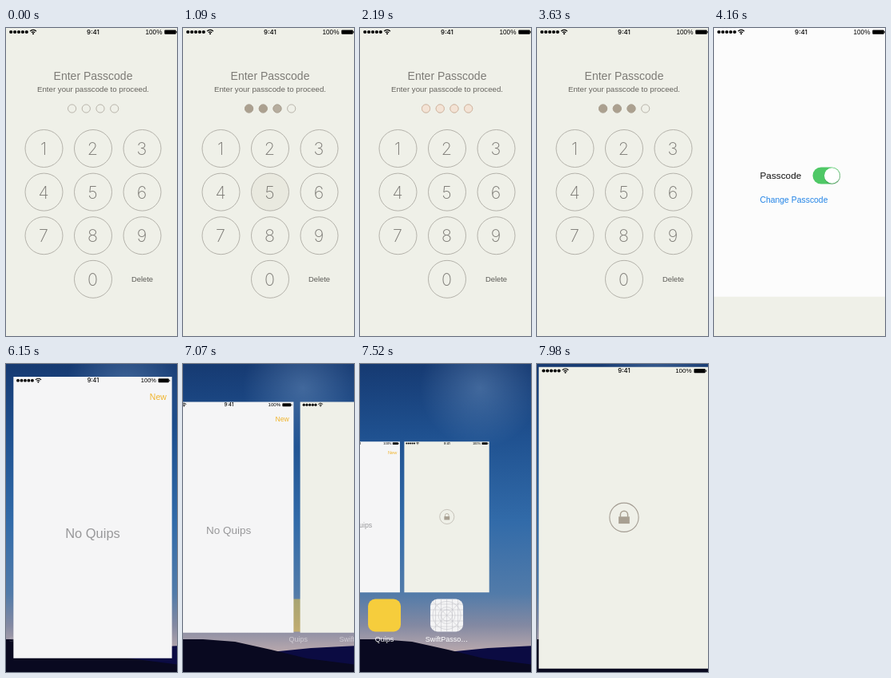
Write an HTML page with a canvas that moves like this. It is 214 px wide and 386 px high and loops after 8 s.

```html
<!DOCTYPE html>
<html lang="en">
<head>
<meta charset="utf-8">
<title>Passcode lock</title>
<style>
  html, body { margin: 0; width: 100%; height: 100%; overflow: hidden; background: #eff0e8; }
  canvas { display: block; width: 214px; height: 386px; }
</style>
</head>
<body>
<canvas id="stage"></canvas>
<script>
const LOOP = 8000, W = 217, H = 386, MID = W / 2;
const SANS = '"Liberation Sans", Arial, sans-serif';
const LIGHT = 'Inter, "Liberation Sans", sans-serif';
const BEIGE = '#eff0e8', TAUPE = '#aba08f';
const canvas = document.getElementById('stage');
const ctx = canvas.getContext('2d');
const ratio = window.devicePixelRatio || 1;
canvas.width = 214 * ratio;
canvas.height = H * ratio;

const clamp = v => Math.min(1, Math.max(0, v));
const easeOut = v => 1 - (1 - clamp(v)) ** 2;
// Critically damped spring from 0 to 1; ms since start, speed in 1/s
const spring = (ms, speed) => {
  const x = Math.max(0, ms) * speed / 1000;
  return 1 - (1 + x) * Math.exp(-x);
};

function text(str, x, y, font, color, align = 'center') {
  ctx.font = font;
  ctx.fillStyle = color;
  ctx.textAlign = align;
  ctx.textBaseline = 'middle';
  ctx.fillText(str, x, y);
}

function circle(x, y, r, fill, stroke, width = 1) {
  ctx.beginPath();
  ctx.arc(x, y, r, 0, Math.PI * 2);
  if (fill) { ctx.fillStyle = fill; ctx.fill(); }
  if (stroke) { ctx.strokeStyle = stroke; ctx.lineWidth = width; ctx.stroke(); }
}

function box(x, y, w, h, fill, r = 0) {
  ctx.beginPath();
  ctx.roundRect(x, y, w, h, r);
  ctx.fillStyle = fill;
  ctx.fill();
}

function withAlpha(alpha, draw) {
  ctx.save();
  ctx.globalAlpha *= clamp(alpha);
  draw();
  ctx.restore();
}

function statusBar() {
  for (let i = 0; i < 5; i++) circle(6.2 + i * 4.9, 5, 2.1, '#000');
  ctx.strokeStyle = '#000';
  ctx.lineWidth = 1.2;
  for (const r of [2.8, 5.2]) {
    ctx.beginPath();
    ctx.arc(34, 7.6, r, -Math.PI * 0.77, -Math.PI * 0.23);
    ctx.stroke();
  }
  circle(34, 7.2, 1, '#000');
  text('9:41', 109, 5.3, '500 8px ' + LIGHT, '#000');
  text('100%', 174.5, 5.3, '8.2px ' + SANS, '#000', 'left');
  box(198.3, 2.4, 14.5, 5.4, '#000', 1);
  box(213.3, 4, 1, 2.2, '#000');
}

function settings() {
  box(0, 0, W, H, '#fcfcfc');
  text('Passcode', 57.5, 185.5, '11.8px ' + SANS, '#111', 'left');
  text('Change Passcode', 57.5, 216.5, '10.4px ' + SANS, '#2384e6', 'left');
  box(123.5, 174.5, 34.5, 21, '#4fc866', 10.5);
  circle(148, 186, 10.2, 'rgba(0,0,0,.16)');
  circle(147.7, 185, 9.7, '#fff');
}

function memos() {
  box(0, 0, W, H, '#f5f5f6');
  text('No Quips', MID, 215.5, '18px ' + SANS, '#98989a');
  text('New', 198, 29, '11.5px ' + SANS, '#f0b42c');
}

function lockScreen() {
  box(0, 0, W, H, BEIGE);
  circle(109, 192.5, 18.5, null, '#a39c92', 1.1);
  box(102, 191.5, 14, 9, '#a8a092');
  ctx.beginPath();
  ctx.moveTo(104.3, 192);
  ctx.lineTo(104.3, 189);
  ctx.arc(109, 189, 4.7, Math.PI, 0);
  ctx.lineTo(113.7, 192);
  ctx.strokeStyle = '#a8a092';
  ctx.lineWidth = 1.5;
  ctx.stroke();
}

// Each press: time and key
const wrong = [[290, 5], [630, 5], [970, 5], [1450, 5]];
const right = [[2540, 1], [2900, 2], [3250, 3], [3920, 4]];
const RETRY = right[0][0], REJECT = 1600, DISMISS = 3982;

function entryDots(t) {
  const retry = t >= RETRY;
  const error = retry ? 1 - clamp((t - RETRY) / 150) : easeOut((t - REJECT) / 350);
  const s = (t - REJECT) / 1000;
  const shake = s > 0 && s < 0.6 ? 15 * Math.exp(-8 * s) * Math.cos(s * 2 * Math.PI / 0.16) : 0;
  (retry ? right : wrong).forEach(([start], i) => {
    const x = 82.6 + 17.7 * i + shake, y = 101;
    const filled = easeOut((t - start) / 200) * (retry ? 1 : 1 - error);
    circle(x, y, 5.1, null, '#b3aea4', 0.9);
    withAlpha(error, () => circle(x, y, 5.1, '#f3e3d5', '#d8b9a2', 0.9));
    withAlpha(filled, () => circle(x, y, 5.1, TAUPE, TAUPE, 0.9));
  });
}

function keypad(t) {
  for (let n = 0; n < 10; n++) {
    const x = n ? 47.5 + (n - 1) % 3 * 61.5 : 109;
    const y = 151 + (n ? Math.floor((n - 1) / 3) : 3) * 54.6;
    const press = [...wrong, ...right].find(([at, key]) => key === n && t >= at && t < at + 200);
    if (press) withAlpha(0.6 * (1 - easeOut((t - press[0]) / 200)), () => circle(x, y, 23.5, TAUPE));
    circle(x, y, 23.5, null, '#adaba3', 0.9);
    text(n, x - 0.5, y + 1.8, '200 21.5px ' + LIGHT, '#7b7974');
  }
  text('Delete', 170.5, 315.3, '9.4px ' + SANS, '#5c5b57');
}

function passcode(t) {
  box(0, 0, W, H, BEIGE);
  text('Enter Passcode', 109, 61, '14px ' + SANS, '#7d7b76');
  text('Enter your passcode to proceed.', 109, 77, '9.7px ' + SANS, '#66645f');
  entryDots(t);
  keypad(t);
}

function shape(color, points) {
  ctx.beginPath();
  points.forEach(([x, y]) => ctx.lineTo(x, y));
  ctx.lineTo(W, H);
  ctx.lineTo(0, H);
  ctx.fillStyle = color;
  ctx.fill();
}

function wallpaper() {
  const sky = ctx.createLinearGradient(0, 0, 0, 360);
  [[0, '#163a72'], [0.25, '#1f5190'], [0.55, '#326ba9'], [0.8, '#527ba9'], [0.91, '#8389a2'], [1, '#b8a8ad']]
    .forEach(([at, color]) => sky.addColorStop(at, color));
  box(0, 0, W, H, sky);
  const glow = ctx.createRadialGradient(150, 30, 0, 150, 30, 75);
  glow.addColorStop(0, 'rgba(140,175,215,.35)');
  glow.addColorStop(1, 'rgba(140,175,215,0)');
  box(0, 0, W, H, glow);
  shape('#0b0b42', [[100, 362], [160, 356], [W, 353]]);
  shape('#090920', [[0, 345], [25, 345], [65, 348], [110, 358], [155, 369], [W, 377]]);
}

function gridIcon(x, y) {
  box(x - 20.5, y - 20.5, 41, 41, '#f4f4f5', 9);
  ctx.save();
  ctx.clip();
  ctx.strokeStyle = '#bdbdc2';
  ctx.lineWidth = 0.5;
  ctx.beginPath();
  for (const d of [-14, -7, 0, 7, 14]) {
    ctx.moveTo(x + d, y - 21); ctx.lineTo(x + d, y + 21);
    ctx.moveTo(x - 21, y + d); ctx.lineTo(x + 21, y + d);
  }
  ctx.moveTo(x - 21, y - 21); ctx.lineTo(x + 21, y + 21);
  ctx.moveTo(x + 21, y - 21); ctx.lineTo(x - 21, y + 21);
  ctx.stroke();
  for (const r of [7, 10.5, 17.5]) circle(x, y, r, null, '#bdbdc2', 0.5);
  ctx.restore();
}

const plainIcon = (x, y) => box(x - 20.5, y - 20.5, 41, 41, '#f6cd3c', 9);
const lockApp = screen => ({ screen, icon: gridIcon, label: 'SwiftPasso…' });
const memoApp = { screen: memos, icon: plainIcon, label: 'Quips' };

// Cards shrink and scroll to the second app, which then zooms to full size
function switcher(t, openAt, tapAt, apps) {
  const shrink = spring(t - openAt, 30);
  const scroll = spring(t - openAt, 20);
  const zoom = spring(t - tapAt, 20);
  const open = shrink * (1 - zoom);
  const scale = 1 - 0.51 * open;
  wallpaper();
  apps.forEach(({ icon, label }, i) => {
    const x = MID + 78 * (i - 1) + 217 * scale * (1 - scroll);
    withAlpha(open, () => {
      icon(x, 315);
      text(label, x, 346, '9px ' + SANS, '#fff');
    });
  });
  apps.forEach(({ screen }, i) => {
    ctx.save();
    ctx.translate(MID + 228 * scale * (i - scroll), H / 2 - 1.3 * Math.sqrt(open));
    ctx.scale(scale, scale);
    ctx.translate(-MID, -H / 2);
    screen();
    statusBar();
    ctx.restore();
  });
}

function render(t) {
  ctx.setTransform(ratio, 0, 0, ratio, 0, 0);
  if (t < 5307) {
    settings();
    ctx.save();
    ctx.translate(0, H * spring(t - DISMISS, 20));
    if (t < 4500) passcode(t);
    ctx.restore();
    statusBar();
  } else if (t < 7016) {
    switcher(t, 5307, 5990, [lockApp(settings), memoApp]);
  } else {
    switcher(t, 7016, 7730, [memoApp, lockApp(lockScreen)]);
  }
}

const begin = performance.now();
function tick() {
  render((performance.now() - begin) % LOOP);
  requestAnimationFrame(tick);
}
tick();
</script>
</body>
</html>
```
